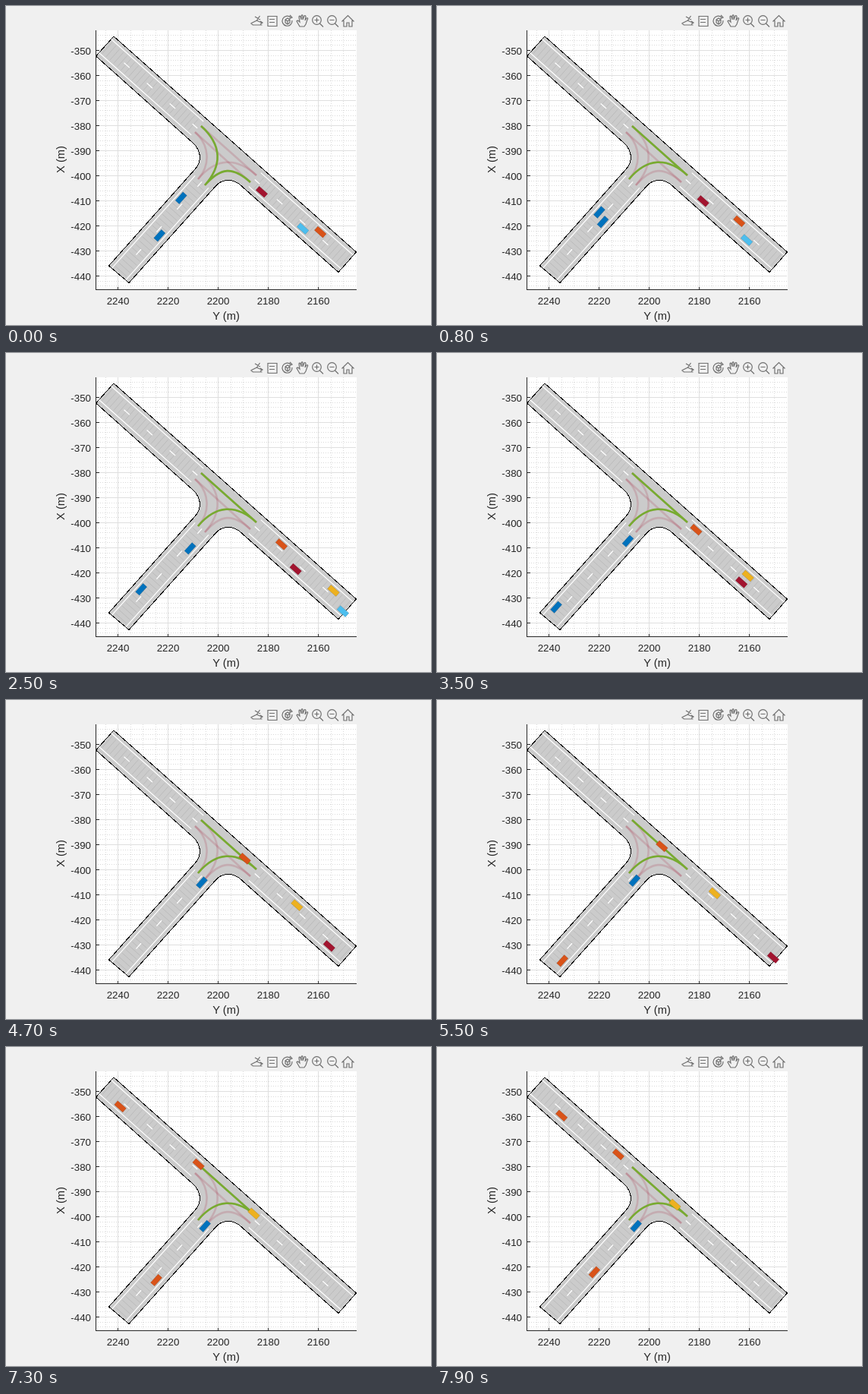
Write an HTML page that moves like this. It is 560 px wide and 420 px high and loops after 8 s.

```html
<!DOCTYPE html>
<html lang="en">
<head>
<meta charset="utf-8">
<title>Junction traffic</title>
<style>
  html, body { margin: 0; width: 100%; height: 100%; overflow: hidden; background: #f0f0f0; }
  svg { display: block; width: 560px; height: 420px; }
  text { font-family: "Liberation Sans", Arial, sans-serif; font-size: 13.33px; fill: #262626; }
  .label { font-size: 14.67px; text-anchor: middle; }
  .icons { fill: none; stroke: #707070; stroke-width: 1.2; }
  .crisp { shape-rendering: crispEdges; }
</style>
</head>
<body>
<svg id="stage" viewBox="0 0 560 420" xmlns="http://www.w3.org/2000/svg">
  <rect x="118" y="32" width="344" height="341" fill="#fff"/>
  <g id="grid" class="crisp" fill="none"></g>
  <path class="crisp" d="M118.500 66L246 180C258 191 258 205 249 215L135.500 342L162 364.500L275 238.500C284 227 300 226 312 238.500L438 350.500L461.500 324L142 40Z"
        fill="#cbcbcb" stroke="#000" stroke-width="1"/>
  <g id="arms" fill="none"></g>
  <g id="routes" fill="none" stroke-width="2.6"></g>
  <g id="cars"></g>
  <g id="axes" class="crisp" stroke="#262626" fill="none"></g>
  <g id="ticks"></g>
  <text class="label" x="290" y="413">Y (m)</text>
  <text class="label" transform="translate(77 202) rotate(-90)">X (m)</text>
  <g class="icons">
    <path d="M322.500 23l8-4 4-6M328 14l7 4M322.500 23l3 2h12M330 19l7 3m-2-2l3 2-3 2"/>
    <path d="M345 13.500h12v13h-12zM347 17.500h7M347 21.500h7"/>
    <path d="M375 15a6.500 6.500 0 1 0 2 4M374 12l3 3-4 2M368 18l3-2 3 2v4l-3 2-3-2zM368 18l3 2 3-2M371 20v4"/>
    <path d="M387 27l-4-7c1-2 3 0 4 1l-1-7c1-2 2-1 3 4v-5c1-2 2-1 2 0v5l2-5c1-1 2 0 2 1l-1 5 2-3c2-1 2 1 1 2l-2 6-2 3z"/>
    <g id="lenses"></g>
    <path d="M442.500 20.500l8-8 8 8M445 19v8h4v-5h3v5h4v-8"/>
  </g>
</svg>
<script>
const LOOP = 8, STEP = 0.1, SWITCH = 0.5;   // seconds
const byId = id => document.getElementById(id);

function add(parent, tag, attrs, text) {
  const el = document.createElementNS("http://www.w3.org/2000/svg", tag);
  for (const key in attrs) el.setAttribute(key, attrs[key]);
  if (text !== undefined) el.textContent = text;
  parent.appendChild(el);
  return el;
}
const path = (parent, d, attrs) => add(parent, "path", { d, ...attrs });

// Plot grid and axes
let minor = "", major = "", marks = "";
for (let x = 131; x < 461; x += 16.5) minor += `M${x} 32V373`;
for (let y = 38.7; y < 373; y += 6.6) minor += `M118 ${y.toFixed(1)}H461`;
for (let i = 0; i < 5; i++) {
  const x = 147.5 + 66 * i;
  major += `M${x} 32V373`;
  marks += `M${x} 373.500v-4`;
  add(byId("ticks"), "text", { x, y: 393, "text-anchor": "middle" }, 2240 - 20 * i);
}
for (let i = 0; i < 10; i++) {
  const y = 58.5 + 33 * i;
  major += `M118 ${y}H461`;
  marks += `M118.500 ${y}h4`;
  add(byId("ticks"), "text", { x: 112, y: y + 5, "text-anchor": "end" }, -350 - 10 * i);
}
path(byId("grid"), minor, { stroke: "#dadada", "stroke-dasharray": "1 2" });
path(byId("grid"), major, { stroke: "#dfdfdf" });
path(byId("axes"), "M118.500 32V373.500H461.500" + marks);

for (const [x, bar] of [[409.5, "v6"], [429.5, ""]]) {
  add(byId("lenses"), "circle", { cx: x, cy: 18.5, r: 5.8 });
  path(byId("lenses"), `M${x - 3} 18.500h6M${x} 15.500${bar}M${x + 4} 23l4.500 4.500`);
}

// Each arm has its own axes: x runs from the outer end into the junction
const arm = (x, y, angle) => `translate(${x} ${y}) rotate(${angle})`;
const WEST = arm(130.5, 52.5, 41.7);
const EAST = arm(449.5, 337, 221.7);
const SOUTH = arm(149, 352.5, -48);

let ribs = "";
for (let s = 4; s < 162; s += 6.6) ribs += `M${s.toFixed(1)} -10V10`;
for (const transform of [WEST, EAST, SOUTH]) {
  const g = add(byId("arms"), "g", { transform });
  path(g, ribs, { stroke: "#b9b9b9", "stroke-width": .8 });
  path(g, "M0 -12H163M0 12H163", { stroke: "#fff", "stroke-width": 1.2 });
  path(g, "M33.500 0H163", { stroke: "#fff", "stroke-width": 1.3, "stroke-dasharray": "9.900 30.400" });
}

// Routes through the junction, grouped by the phase that opens them
const closed = ["M249 166L322 232", "M249 166C268 183 270 209 253 228"];
const phases = [
  ["M257 158C285 183 285 210 262 236", "M262 236C283 212 299 211 322 232"],
  ["M257 158L330 223", "M253 228C276 200.500 303 198 330 223"]
];
for (const d of [...closed, ...phases.flat()])
  path(byId("routes"), d, { stroke: "#a2142f", "stroke-opacity": .17 });
const open = phases.map(p => path(byId("routes"), p.join(""), { stroke: "#77ac30" }));

// Motion along an arm: from s0, at speed v, with half the acceleration h
const run = (s0, v, h = 0) => u => s0 + v * u + h * u * u;
const halt = (s0, s1) => u => s1 - (s1 - s0) * (1 - u / LOOP) ** 3;

const BLUE = "#0072bd", RED = "#a2142f", ORANGE = "#d95319", YELLOW = "#edb120", CYAN = "#4dbeee";
const LANE = 6;
function car(fill, arm, lane, motion, born = 0) {
  const el = add(byId("cars"), "rect", {
    x: -7.5, y: -3.5, width: 15, height: 7, fill, stroke: "#000", "stroke-opacity": .25, "stroke-width": .5
  });
  return { el, arm, lane, motion, born };
}
const cars = [
  car(BLUE, SOUTH, LANE, halt(73, 162.5)),
  car(BLUE, SOUTH, -LANE, run(128.8, -31.45)),
  car(RED, EAST, -LANE, run(145.4, -22.4, -.62)),
  car(CYAN, EAST, -LANE, run(72.8, -28.25)),
  car(ORANGE, EAST, LANE, run(52.6, 26.4, .42)),
  car(YELLOW, EAST, LANE, run(6, 29.3), 1.7),
  car(ORANGE, SOUTH, LANE, run(2.1, 32, -1.7), 5),
  car(ORANGE, WEST, LANE, run(4.9, 30.3), 6.4)
];

function draw(time) {
  const t = Math.floor(time % LOOP / STEP + 1e-6) * STEP;
  open.forEach((el, i) => el.style.display = (t >= SWITCH) === (i === 1) ? "" : "none");
  for (const { el, arm, lane, motion, born } of cars) {
    const s = motion(t - born);
    el.style.display = t > born - STEP / 2 && s > 1 ? "" : "none";
    el.setAttribute("transform", `${arm} translate(${s.toFixed(2)} ${lane})`);
  }
}

const start = performance.now();
function tick() {
  draw((performance.now() - start) / 1000);
  requestAnimationFrame(tick);
}
tick();
</script>
</body>
</html>
```
